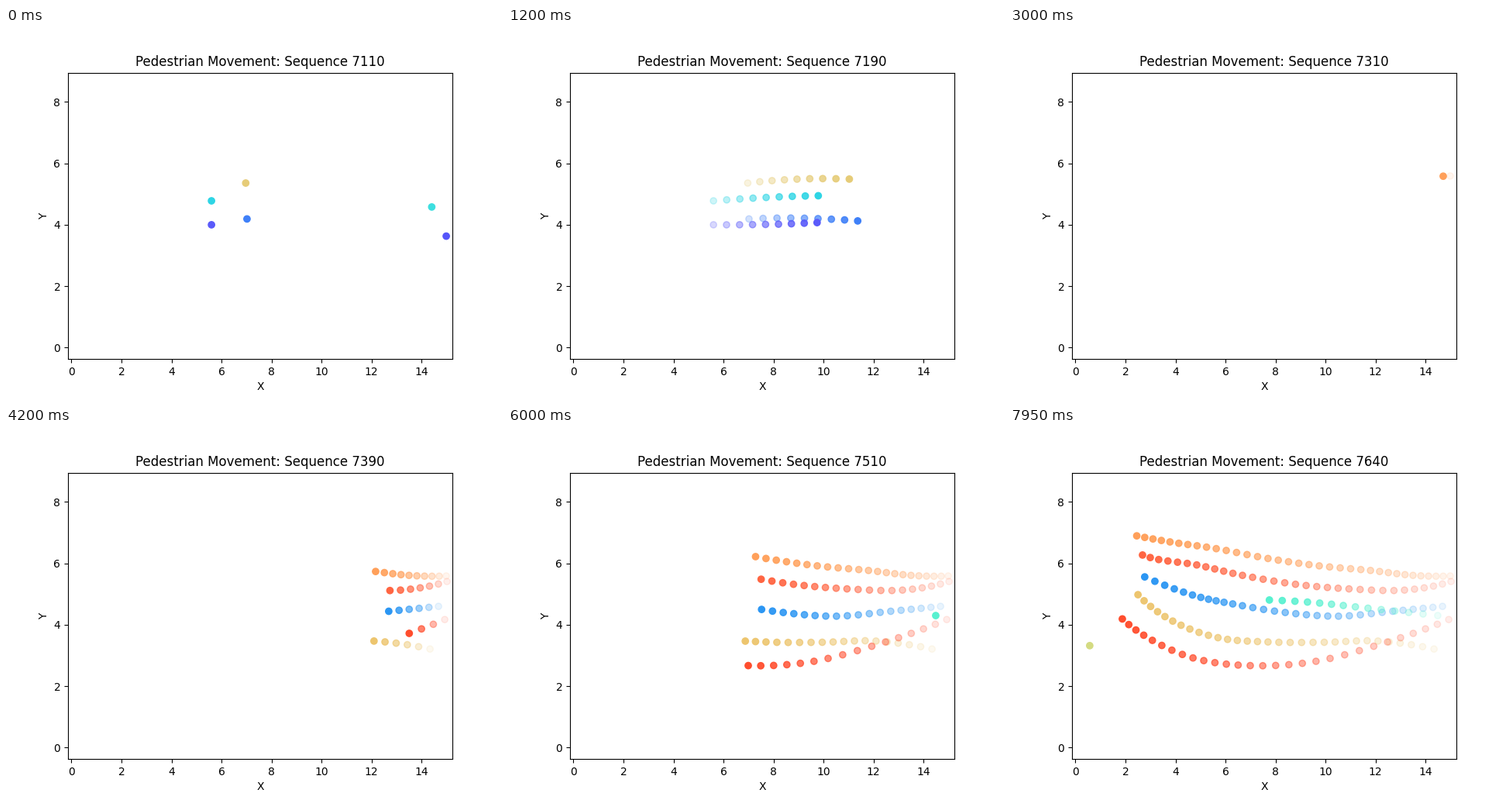
Animation, 640 px wide and 480 px high, one loop 8 s. Source, as a matplotlib script:

```python
import numpy as np
import matplotlib.pyplot as plt
from matplotlib.animation import FuncAnimation
from matplotlib.colors import to_rgb

WIDTH, HEIGHT, DPI = 640, 480, 100
TICKS_PER_STEP, TICK_MS, TICKS = 3, 50, 160
FIRST_SEQUENCE, SEQUENCE_STEP = 7110, 10
KEY_STEPS = 5   # steps between two key points of a path
EXIT_X = 15.05  # walkers beyond this have left the scene

# Each walker: colour, first step, key points (x, y) at even time steps.
RIGHTWARD = [
    ("#e6cc78", 0, [(6.97, 5.36), (9.45, 5.50), (12.10, 5.46), (14.74, 5.36)]),
    ("#2ed5e5", 0, [(5.60, 4.78), (8.23, 4.91), (10.83, 4.96), (16.04, 5.01)][:3] + [(13.44, 4.98), (16.04, 5.01)]),
    ("#3f80f8", 0, [(7.02, 4.19), (9.78, 4.20), (12.41, 4.01), (14.99, 3.40)]),
    ("#5a5afa", 0, [(5.60, 4.00), (8.20, 4.02), (10.77, 4.10), (13.34, 4.10), (15.98, 4.07)]),
    ("#3ddfe0", 0, [(14.41, 4.58), (17.0, 4.5)]),
    ("#5555fa", 0, [(14.99, 3.63), (17.6, 3.6)]),
]
LEFTWARD = [
    ("#ffa05a", 19, [(14.99, 5.59), (13.50, 5.61), (11.80, 5.77), (9.75, 5.92),
                     (7.70, 6.16), (5.63, 6.48), (3.78, 6.70), (2.14, 6.95)]),
    ("#ff6542", 22, [(15.02, 5.41), (13.16, 5.13), (10.94, 5.17), (8.80, 5.32),
                     (6.68, 5.61), (4.85, 5.95), (2.99, 6.19), (1.66, 6.72)]),
    ("#2b96f3", 23, [(14.68, 4.60), (12.69, 4.44), (10.52, 4.28), (8.39, 4.40),
                     (6.29, 4.68), (4.68, 4.97), (2.77, 5.56)]),
    ("#edc56e", 23, [(14.34, 3.21), (12.10, 3.47), (9.95, 3.43), (7.70, 3.44),
                     (5.70, 3.58), (3.89, 4.12), (2.50, 4.98)]),
    ("#ff4d2d", 25, [(14.93, 4.17), (12.48, 3.44), (9.62, 2.81), (6.99, 2.67),
                     (4.70, 2.92), (2.73, 3.66), (1.44, 4.58)]),
    ("#58f1d0", 40, [(14.49, 4.30), (11.70, 4.54), (9.28, 4.74), (6.71, 4.83)]),
    ("#d4db82", 53, [(0.57, 3.32), (2.5, 3.4)]),
]


def walk(keys):
    """One position per step along a smooth cubic curve, up to the exit."""
    keys = np.array(keys)
    last = len(keys) - 1
    slopes = np.gradient(keys, axis=0, edge_order=min(2, last))
    t = np.arange(last * KEY_STEPS + 1) / KEY_STEPS
    i = np.minimum(t.astype(int), last - 1)
    u = (t - i)[:, None]
    path = ((1 + 2 * u) * (1 - u) ** 2 * keys[i] + u * (1 - u) ** 2 * slopes[i]
            + u ** 2 * (3 - 2 * u) * keys[i + 1] + u ** 2 * (u - 1) * slopes[i + 1])
    return path[path[:, 0] < EXIT_X]


plt.rcParams["font.family"] = "DejaVu Sans"
fig, ax = plt.subplots(figsize=(WIDTH / DPI, HEIGHT / DPI), dpi=DPI)
ax.set(xlim=(-0.139, 15.236), ylim=(-0.376, 8.957), xlabel="X", ylabel="Y")
title = ax.set_title("")
dots = ax.scatter([], [])

walkers = [(to_rgb(color), start, faintest, walk(keys))
           for group, faintest in ((RIGHTWARD, 0.23), (LEFTWARD, 0.1))
           for color, start, keys in group]


def draw(tick):
    step = tick // TICKS_PER_STEP
    offsets, colors = [], []
    for rgb, start, faintest, path in walkers:
        count = step - start + 1
        if 1 <= count <= len(path):
            offsets.extend(path[:count])
            colors.extend((*rgb, alpha) for alpha in np.linspace(1, faintest, count)[::-1])
    dots.set_offsets(offsets)
    dots.set_color(colors)
    title.set_text(f"Pedestrian Movement: Sequence {FIRST_SEQUENCE + SEQUENCE_STEP * step}")
    return dots, title


anim = FuncAnimation(fig, draw, frames=TICKS, interval=TICK_MS, repeat=True, repeat_delay=0)
plt.show()
```
